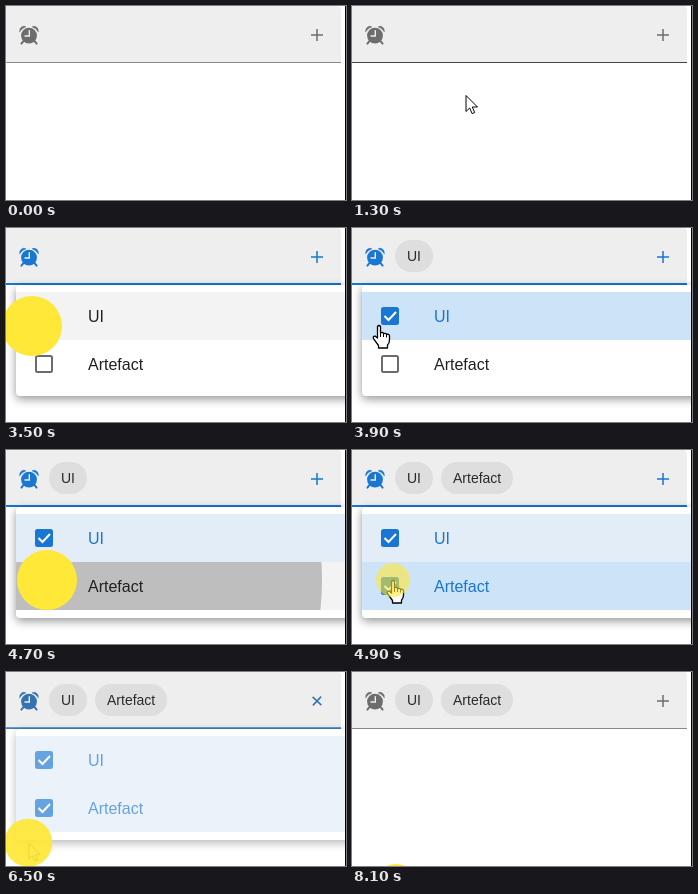
An HTML page that plays this animation: 340 by 194 pixels, repeating every 8300 ms.

```html
<!DOCTYPE html>
<html lang="en">
<head>
<meta charset="utf-8">
<title>Select with chips</title>
<style>
  html, body { margin: 0; width: 100%; height: 100%; overflow: hidden; background: #fff; }
  svg { display: block; width: 340px; height: 194px; font-family: "Liberation Sans", Arial, sans-serif; }
  #panel { filter: drop-shadow(0 3px 5px rgba(0, 0, 0, .42)); }
  .chip rect { fill: #dedede; }
  .chip text { font-size: 14px; fill: #2b2b2b; }
  .row text { font-size: 16px; }
</style>
</head>
<body>
<svg viewBox="0 0 340 194">
  <defs>
    <clipPath id="clip1"><rect x="10" y="64" width="329" height="48"/></clipPath>
    <clipPath id="clip2"><rect x="10" y="112" width="329" height="48"/></clipPath>
  </defs>
  <path id="field" d="M0 0H331Q335 0 335 4V56H0Z"/>
  <rect id="line" y="56" width="335" height="1"/>
  <rect id="focus" y="55" height="2"/>

  <g id="alarm" transform="translate(23 29)" fill="none" stroke-linecap="round">
    <circle cy=".6" r="7.9" fill="currentColor"/>
    <path d="M-5.6 6.2L-7.6 8.6M5.6 6.2L7.6 8.6" stroke="currentColor" stroke-width="2"/>
    <path d="M-9.2-3.6A4.2 4.2 0 0 1-3.2-8.2Q-7-6.8-9.2-3.6ZM9.2-3.6A4.2 4.2 0 0 0 3.2-8.2Q7-6.8 9.2-3.6Z" fill="currentColor" stroke="currentColor" stroke-width=".6"/>
    <path d="M.3-4.4V1H-4" stroke="#eee" stroke-width="1.4"/>
  </g>
  <path id="plus" d="M-6 0H6M0-6V6" stroke="currentColor" stroke-width="1.5"/>

  <g class="chip" id="chip1">
    <rect x="43" y="12" width="38" height="32" rx="16"/><text x="55" y="33">UI</text>
  </g>
  <g class="chip" id="chip2">
    <rect x="89" y="12" width="72" height="32" rx="16"/><text x="101" y="33">Artefact</text>
  </g>

  <g id="menu">
    <rect id="panel" x="10" y="57" width="345" height="111" rx="4" fill="#fff"/>
    <g id="rows"></g>
  </g>

  <g id="cursor" fill="#fff" stroke="#000" stroke-linejoin="round">
    <path id="arrow" d="M.5.5V16.5L4.2 13L6.6 18.6L9.2 17.5L6.8 12H12Z"/>
    <g id="hand">
      <path stroke-width="1.3" d="M-1.5 1.5q1.5-2 3 0V8q2.5-1.5 3 .7q2.5-1 3 .8q2.5-.8 3 1.2V15q0 3-2 5V23H-.5V20.5L-5.5 13.6q-.8-2.8 1.6-2.5L-1.5 13Z"/>
      <path fill="none" d="M1.5 8V12M4.5 9V12M7.5 10V12.5"/>
    </g>
  </g>
  <circle id="press" fill="#ffe838"/>
  <rect x="339" width="1" height="194"/>
</svg>
<script>
const $ = id => document.getElementById(id);
const LOOP = 8300, STEP = 100;
const GRAY = [109, 109, 109], BLUE = [25, 118, 210], DARK = [33, 33, 33], BLACK = [0, 0, 0];
const WHITE = [255, 255, 255], HOVER = [243, 243, 243], ACTIVE = [227, 237, 247], LIT = [205, 227, 247];

// time, x, y of the pointer's hot spot
const PATH = [
  [600, 132, 198], [1100, 122, 118], [1500, 105, 60], [1800, 84, 25], [2900, 84, 25],
  [3300, 26, 98], [3700, 26, 98], [3800, 27, 97], [3900, 27, 97], [4000, 14, 108],
  [4300, 41, 130], [5300, 41, 130], [5500, 11, 146], [5700, 6, 162], [6200, 24, 176],
  [6400, 24, 176], [6700, 19, 160], [6900, 19, 160], [7300, 53, 186], [7400, 44, 216]
];
// start and length of each press
const PRESSES = [[2100, 400], [3400, 400], [4500, 500], [6400, 300], [8100, 400]];
// row top, label, hover start, selection time, ripple start
const ROWS = [
  { y: 64, label: 'UI', hover: 3100, pick: 3700, calm: 4000, ripple: 3600, x: 26, cy: 98 },
  { y: 112, label: 'Artefact', hover: 4000, pick: 4800, calm: 5000, ripple: 4600, x: 41, cy: 130 }
];

const clamp = v => Math.max(0, Math.min(1, v));
const ramp = (t, a, b) => clamp((t - a) / (b - a));
const smooth = v => v * v * (3 - 2 * v);
const mix = (a, b, k) => `rgb(${a.map((v, i) => Math.round(v + (b[i] - v) * k))})`;
const set = (el, attrs) => { for (const k in attrs) el.setAttribute(k, attrs[k]); };
const show = (el, on) => { el.style.display = on ? '' : 'none'; };

$('rows').innerHTML = ROWS.map((r, i) => `
  <g class="row" clip-path="url(#clip${i + 1})">
    <rect id="bg${i}" x="10" y="${r.y}" width="329" height="48"/>
    <circle id="ripple${i}" cx="${r.x}" cy="${r.cy}"/>
    <rect id="box${i}" x="30" y="${r.y + 16}" width="16" height="16" rx="1.5" stroke-width="2"/>
    <path id="tick${i}" d="M32.5 ${r.y + 24}L36.5 ${r.y + 28}L44 ${r.y + 20}" fill="none" stroke="#fff" stroke-width="2"/>
    <text id="label${i}" x="82" y="${r.y + 30}">${r.label}</text>
  </g>`).join('');

function pointAt(t) {
  let i = 1;
  while (i < PATH.length - 1 && PATH[i][0] < t) i++;
  const [a, x, y] = PATH[i - 1], [b, x2, y2] = PATH[i], k = ramp(t, a, b);
  return [x + (x2 - x) * k, y + (y2 - y) * k];
}

function drawRow(r, i, t) {
  const picked = t >= r.pick;
  set($('bg' + i), {
    fill: picked ? mix(LIT, ACTIVE, ramp(t, r.calm, r.calm + 300))
                 : mix(WHITE, HOVER, ramp(t, r.hover, r.hover + 300))
  });
  const age = t - r.ripple;
  set($('ripple' + i), {
    r: age < 0 ? 0 : 130 + age * 1.45,
    opacity: .22 * (1 - ramp(age, 100, 300))
  });
  set($('box' + i), { fill: picked ? mix(BLUE, BLUE, 0) : 'none', stroke: picked ? mix(BLUE, BLUE, 0) : '#6b6b6b' });
  show($('tick' + i), picked);
  set($('label' + i), { fill: mix(DARK, BLUE, picked ? 1 : 0) });
}

function drawPress(t, x, y) {
  const p = PRESSES.find(([start, len]) => t >= start && t < start + len);
  show($('press'), p);
  if (!p) return;
  const age = t - p[0], left = p[0] + p[1] - t;
  const r = left <= 100 ? 17 : left <= 200 || age < 100 ? 24 : 30;
  set($('press'), { cx: x, cy: y, r, opacity: left <= 100 ? .6 : r < 30 ? .92 : 1 });
}

function draw(t) {
  const close = ramp(t, 6400, 6700);
  const tint = ramp(t, 2100, 2550) * (1 - close);
  const grow = smooth(ramp(t, 2200, 2580));
  const turn = 180 * smooth(ramp(t, 2200, 2700)) * (1 - smooth(close));
  const dim = ramp(t, 2000, 2300) * (1 - ramp(t, 2300, 2800));

  set($('field'), { fill: mix([238, 238, 238], [224, 224, 224], t < 2100 ? 0 : dim) });
  set($('line'), { fill: mix([138, 138, 138], BLACK, t < 3000 ? ramp(t, 1100, 1500) : 0) });
  set($('focus'), { x: 167.5 * (1 - grow), width: 335 * grow, fill: mix(BLACK, BLUE, ramp(t, 2200, 2600)), opacity: 1 - close });
  $('alarm').style.color = $('plus').style.color = mix(GRAY, BLUE, tint);
  set($('plus'), { transform: `translate(311 29) rotate(${turn})` });

  show($('chip1'), t >= ROWS[0].pick);
  show($('chip2'), t >= ROWS[1].pick);
  const open = ramp(t, 2400, 2800) * (1 - close);
  show($('menu'), open > 0);
  set($('menu'), { opacity: open });
  ROWS.forEach((r, i) => drawRow(r, i, t));

  const [x, y] = pointAt(t), hand = t >= 1500 && t < 5700;
  show($('cursor'), t >= 700 && t < 7400);
  set($('cursor'), { transform: `translate(${x} ${y})` });
  show($('hand'), hand);
  show($('arrow'), !hand);
  drawPress(t, x, y);
}

const begin = performance.now();
function tick() {
  const t = (performance.now() - begin) % LOOP;
  draw(Math.floor(t / STEP) * STEP);
  requestAnimationFrame(tick);
}
tick();
</script>
</body>
</html>
```
